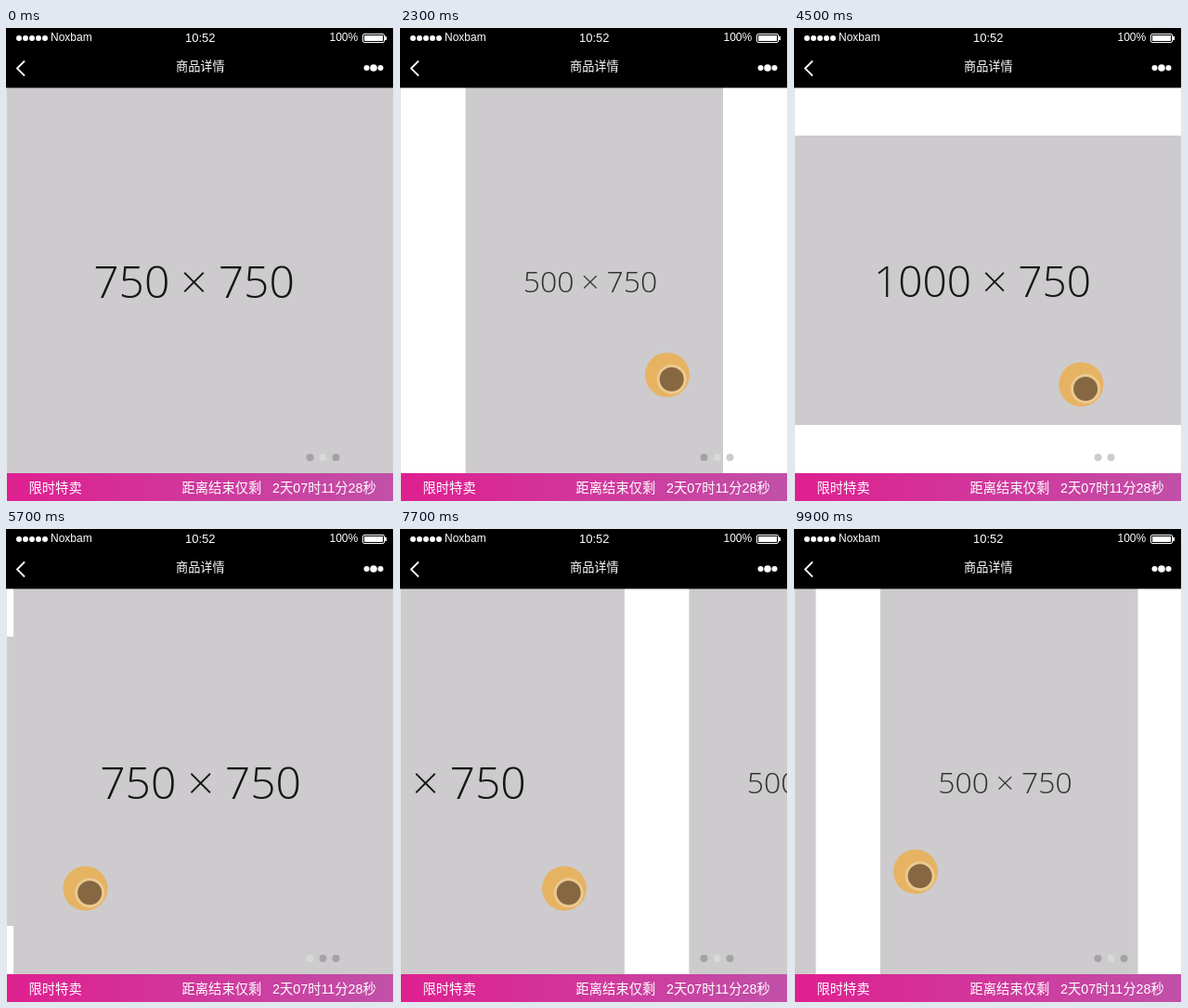
An HTML page that plays this animation: 418 px wide and 510 px high, repeating every 10 s.

```html
<!DOCTYPE html>
<html lang="zh-CN">
<head>
<meta charset="utf-8">
<title>商品详情</title>
<style>
  html, body { margin: 0; width: 100%; height: 100%; overflow: hidden; background: #fff; }
  svg { display: block; width: 418px; height: 510px; }
  text { font-family: "Liberation Sans", "Noto Sans CJK SC", "Noto Sans CJK", sans-serif; fill: #fff; }
  .size { font-family: "Open Sans", "Noto Sans", sans-serif; font-weight: 300; fill: #161616; text-anchor: middle; }
  .photo { fill: #cdcbcd; }
  .small { font-size: 12px; }
  .sale { font-size: 14.3px; }
</style>
</head>
<body>
<svg viewBox="0 0 418 510">
  <defs>
    <linearGradient id="pink">
      <stop offset="0" stop-color="#df1f90"/>
      <stop offset="1" stop-color="#c150a8"/>
    </linearGradient>
    <clipPath id="view"><rect x="1" y="64" width="416" height="416"/></clipPath>
  </defs>
  <rect width="418" height="510" fill="#e6e6e6"/>

  <g clip-path="url(#view)">
    <rect y="64" width="418" height="416" fill="#fff"/>
    <g class="slide">
      <rect class="photo" y="64" width="416" height="416"/>
      <text class="size" x="201.5" y="290.5" font-size="48">750 × 750</text>
    </g>
    <g class="slide">
      <rect class="photo" x="69.5" y="64" width="277.5" height="416"/>
      <text class="size" x="204" y="285" font-size="32" style="fill:#333">500 × 750</text>
    </g>
    <g class="slide">
      <rect class="photo" y="116" width="416" height="312"/>
      <text class="size" x="202" y="290" font-size="46">1000 × 750</text>
    </g>
    <circle class="dot" cx="327.5" cy="463" r="4"/>
    <circle class="dot" cx="341.5" cy="463" r="4"/>
    <circle class="dot" cx="355.5" cy="463" r="4"/>
  </g>

  <!-- status and title bars -->
  <rect width="417" height="64.5"/>
  <g fill="#fff">
    <circle cx="14" cy="11" r="3"/><circle cx="21" cy="11" r="3"/><circle cx="28" cy="11" r="3"/>
    <circle cx="35" cy="11" r="3"/><circle cx="42" cy="11" r="3"/>
    <circle cx="388.5" cy="43" r="3"/><circle cx="396" cy="43" r="3.8"/><circle cx="403.5" cy="43" r="3"/>
    <rect x="386" y="8" width="20" height="6"/>
    <rect x="408" y="9" width="2" height="4"/>
  </g>
  <rect x="384.5" y="6.5" width="23" height="9" rx="1.5" fill="none" stroke="#fff"/>
  <path d="M20 35.5L12 43.5L20 51.5" fill="none" stroke="#fff" stroke-width="1.8"/>
  <text class="small" x="48" y="14">Noxbam</text>
  <text x="193" y="14.5" font-size="13">10:52</text>
  <text class="small" x="348.5" y="14">100%</text>
  <text x="183" y="46" font-size="13.2">商品详情</text>

  <!-- sale banner -->
  <rect x="1" y="480" width="416" height="30" fill="url(#pink)"/>
  <text class="sale" x="24.5" y="501">限时特卖</text>
  <text class="sale" x="189.5" y="501">距离结束仅剩</text>
  <text class="sale" x="287" y="501">2天07时11分28秒</text>

  <g id="cursor">
    <circle r="24" fill="rgba(248,162,24,.58)"/>
    <circle cx="4.7" cy="4.7" r="16" fill="rgba(238,208,160,.75)"/>
    <circle cx="4.7" cy="4.7" r="13" fill="#856842"/>
  </g>
</svg>
<script>
  const LOOP = 10, STEP = .1, WIDTH = 416;
  const slides = document.querySelectorAll('.slide');
  const dots = document.querySelectorAll('.dot');
  const cursor = document.getElementById('cursor');

  // [seconds, carousel position in slides]
  const scroll = [[0, 0], [.2, .03], [1.1, .489], [1.4, .82], [1.7, .96], [2, 1], [2.6, 1],
    [3.3, 1.579], [3.6, 1.86], [3.9, 1.97], [4.2, 2], [4.6, 2], [5.2, 2.6], [5.4, 2.83],
    [5.7, 2.983], [5.9, 3], [6.9, 3], [7.5, 3.25], [7.7, 3.421], [8, 3.8], [8.2, 3.94],
    [8.5, 3.999], [9.4, 4], [9.9, 3.946]];

  // [seconds, x, y]
  const path = [[.1, 320, 350], [1.1, 117, 359.5], [1.7, 112, 362], [2.6, 376, 380],
    [3.3, 136.5, 385.5], [3.8, 130, 386], [4.6, 335, 384], [5.2, 92, 387], [5.7, 85.5, 387.5],
    [5.9, 86, 388], [6.9, 290, 384], [7.5, 186, 387], [7.7, 177, 387.5], [8.5, 177, 386.5],
    [9.4, 109, 371], [9.9, 131, 369.5]];

  // [seconds, selected dot]
  const picks = [[0, 1], [3.1, 2], [5.3, 0], [7.5, 1]];

  function at(keys, t, col = 1) {
    const n = keys.findIndex(k => k[0] >= t);
    if (n < 1) return (n ? keys.at(-1) : keys[0])[col];
    const a = keys[n - 1], b = keys[n];
    return a[col] + (b[col] - a[col]) * (t - a[0]) / (b[0] - a[0]);
  }

  function draw(now) {
    const t = Math.floor(now / 1000 % LOOP / STEP + 1e-6) * STEP;
    const pos = at(scroll, t);
    slides.forEach((s, i) => {
      const offset = (i - pos + 7) % 3 - 1;
      s.setAttribute('transform', `translate(${(1 + WIDTH * offset).toFixed(1)})`);
    });
    const active = picks.findLast(k => k[0] <= t + .001)[1];
    dots.forEach((d, i) =>
      d.setAttribute('fill', i === active ? 'rgba(255,255,255,.25)' : 'rgba(0,0,0,.2)'));
    cursor.setAttribute('transform', `translate(${at(path, t)} ${at(path, t, 2)})`);
    cursor.setAttribute('visibility', t < STEP / 2 ? 'hidden' : 'visible');
    requestAnimationFrame(frame);
  }

  const start = performance.now();
  function frame() { draw(performance.now() - start); }
  frame();
</script>
</body>
</html>
```
